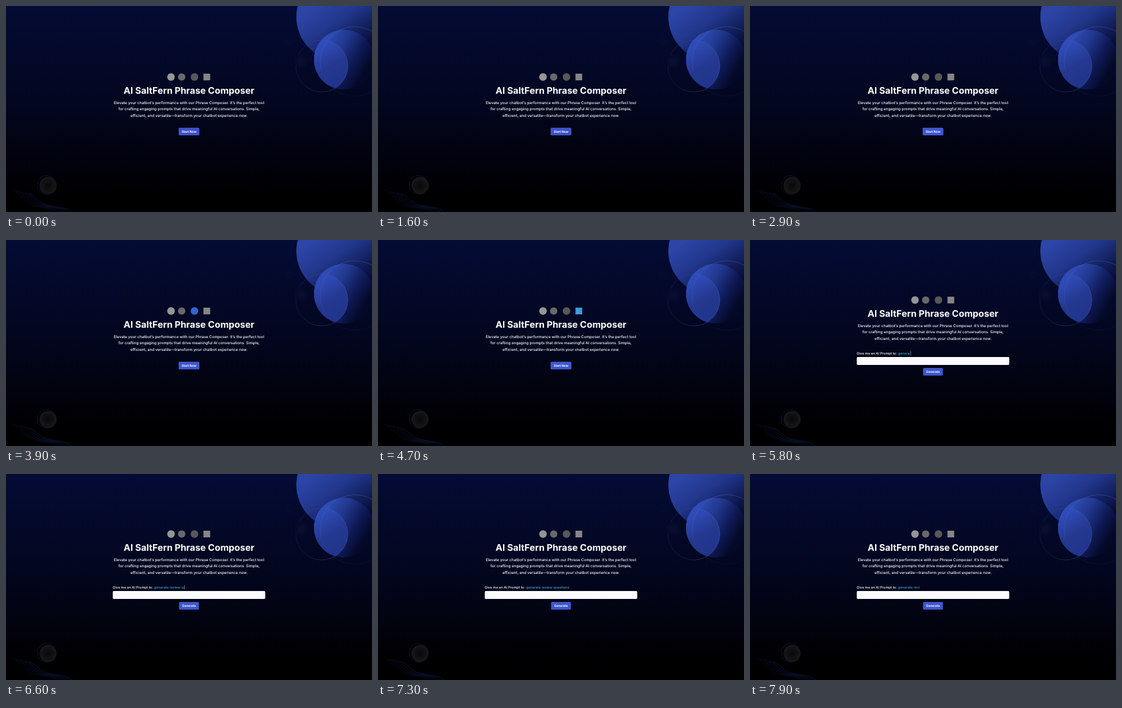
Animation of 600 by 338 pixels, one loop 8000 ms. Source, as an HTML page:

```html
<!DOCTYPE html>
<html lang="en">
<head>
<meta charset="utf-8">
<title>AI SaltFern Phrase Composer</title>
<style>
  html, body { margin: 0; width: 100%; height: 100%; overflow: hidden; background: #000; }
  svg { display: block; width: 100%; height: 100%; }
  text { font-family: Inter, "Open Sans", sans-serif; fill: #fff; text-rendering: geometricPrecision; white-space: pre; }
  .mid { text-anchor: middle; }
  .title { font-size: 15px; font-weight: 700; }
  .body { font-size: 6.25px; font-weight: 500; }
  .label { font-size: 5.625px; font-weight: 500; }
  .typed { fill: #3fa3d0; }
  .button { font-size: 5px; font-weight: 700; }
  .line { fill: none; stroke: #2a47b5; stroke-width: .5; }

  .head { animation: lift 8s step-end infinite; }
  .intro { animation: leave 8s step-end infinite; }
  .form { visibility: hidden; animation: enter 8s step-end infinite; }
  .start { fill: #3d52c9; animation: press 8s linear infinite; }
  .icon { fill: var(--gray); animation: tint 8s linear infinite; }

  @keyframes lift { 0% { transform: none; } 72.5%, 100% { transform: translateY(-18px); } }
  @keyframes leave { 0% { visibility: visible; } 72.5%, 100% { visibility: hidden; } }
  @keyframes enter { 0% { visibility: hidden; } 72.5%, 100% { visibility: visible; } }
  @keyframes press {
    0%, 20% { fill: #3d52c9; }
    23.75%, 66% { fill: #3f58d0; }
    68.5%, 100% { fill: #4a64f0; }
  }
  @keyframes tint {
    0% { fill: var(--gray); }
    2%, 5.5% { fill: var(--tint); }
    7.5%, 100% { fill: var(--gray); }
  }
</style>
</head>
<body>
<svg viewBox="0 0 600 338" preserveAspectRatio="none">
  <defs>
    <linearGradient id="sky" x2="0" y2="1">
      <stop offset="0" stop-color="#040b35"/>
      <stop offset=".5" stop-color="#02061d"/>
      <stop offset=".9" stop-color="#000002"/>
      <stop offset="1" stop-color="#000"/>
    </linearGradient>
    <linearGradient id="moon" gradientUnits="userSpaceOnUse" x1="505" y1="0" x2="565" y2="85">
      <stop offset="0" stop-color="#2c45a6"/>
      <stop offset=".4" stop-color="#22378c"/>
      <stop offset="1" stop-color="#060c36"/>
    </linearGradient>
    <linearGradient id="orb" gradientUnits="userSpaceOnUse" x1="518" y1="62" x2="590" y2="104">
      <stop offset="0" stop-color="#2f4dba"/>
      <stop offset=".35" stop-color="#22398f"/>
      <stop offset=".7" stop-color="#0f1a57"/>
      <stop offset="1" stop-color="#040927"/>
    </linearGradient>
    <linearGradient id="lens" gradientUnits="userSpaceOnUse" x1="512" y1="70" x2="550" y2="130">
      <stop offset="0" stop-color="#2f4bb8"/>
      <stop offset=".5" stop-color="#24388f"/>
      <stop offset="1" stop-color="#20348c"/>
    </linearGradient>
    <linearGradient id="arc" x1=".3" y1="0" x2=".6" y2="1">
      <stop offset="0" stop-color="#5a70c4" stop-opacity=".8"/>
      <stop offset="1" stop-color="#2a3a80" stop-opacity=".25"/>
    </linearGradient>
    <linearGradient id="ring">
      <stop offset="0" stop-color="#2a3a80" stop-opacity=".6"/>
      <stop offset="1" stop-color="#5a70c4" stop-opacity=".8"/>
    </linearGradient>
    <radialGradient id="dust">
      <stop offset="0" stop-color="#08080a"/>
      <stop offset=".6" stop-color="#111113"/>
      <stop offset="1" stop-color="#18181b"/>
    </radialGradient>
    <clipPath id="overlap"><circle cx="517.7" cy="98.5" r="42.5"/></clipPath>
  </defs>

  <rect width="600" height="338" fill="url(#sky)"/>

  <circle cx="549" cy="18" r="73" fill="url(#moon)"/>
  <circle cx="554" cy="88" r="49" fill="url(#orb)"/>
  <circle cx="554" cy="88" r="49" fill="url(#lens)" clip-path="url(#overlap)"/>
  <circle cx="572" cy="91" r="57" fill="none" stroke="url(#arc)" stroke-width=".5"/>
  <circle cx="517.7" cy="98.5" r="42.5" fill="none" stroke="url(#ring)" stroke-width=".5"/>
  <circle cx="465" cy="57" r="5.5" fill="#040a2c" stroke="#0a133f" stroke-width=".5"/>
  <circle cx="484" cy="90" r="11" fill="#060b2b"/>
  <circle cx="484" cy="90" r="6" fill="#080e2f"/>

  <circle class="line" cx="66.5" cy="293.5" r="15.3" opacity=".5"/>
  <circle cx="69" cy="294.5" r="14" fill="url(#dust)"/>
  <g id="waves" class="line" opacity=".6"></g>

  <g class="head">
    <circle class="icon" cx="270.5" cy="116.5" r="6.2" style="--gray:#959595;--tint:#74aa9c;animation-delay:2.95s"/>
    <circle class="icon" cx="288" cy="116.5" r="6" style="--gray:#696969;--tint:#4a7fd6;animation-delay:3.15s"/>
    <circle class="icon" cx="309" cy="116.5" r="6.2" style="--gray:#585858;--tint:#2f66d0;animation-delay:3.7s"/>
    <rect class="icon" x="323.7" y="111" width="11" height="11" style="--gray:#858585;--tint:#3f9bd6;animation-delay:4.45s"/>
    <text class="title mid" x="300" y="143.6">AI SaltFern Phrase Composer</text>
    <text class="body mid" x="300" y="161.2">Elevate your chatbot’s performance with our Phrase Composer. It’s the perfect tool</text>
    <text class="body mid" x="300" y="171.4">for crafting engaging prompts that drive meaningful AI conversations. Simple,</text>
    <text class="body mid" x="300" y="181.6">efficient, and versatile—transform your chatbot experience now.</text>
  </g>

  <g class="intro">
    <rect class="start" x="283" y="199.7" width="34" height="12.6" rx="1.6"/>
    <text class="button mid" x="300" y="207.9">Start Now</text>
  </g>

  <g class="form">
    <text class="label" x="175" y="188">Give me an AI Prompt to:</text>
    <text class="label typed" x="242.8" y="188"><tspan id="words"></tspan><tspan id="caret" dx=".6" fill="#dfe6f5">|</tspan></text>
    <rect x="175" y="192" width="250" height="13" rx="1.8" fill="#fafaff"/>
    <rect x="283.8" y="210" width="32.4" height="12.6" rx="1.6" fill="#3f57d0"/>
    <text class="button mid" x="300" y="218.2">Generate</text>
  </g>
</svg>
<script>
  const LOOP = 8000;
  const PHRASE = "generate review questions";
  const words = document.getElementById("words");
  const caret = document.getElementById("caret");
  const waves = document.getElementById("waves");

  for (let i = 0; i < 5; i++) {
    const path = document.createElementNS("http://www.w3.org/2000/svg", "path");
    const x = 10 + i * 7, y = 302 + i * 1.5;
    const midX = 48 + i * 5, midY = 329 - i * .6;
    path.setAttribute("d", `M${x} ${y}C${x + 14} ${y + 5} ${midX - 16} ${midY - 4} ${midX} ${midY}S${78 + i * 6} ${331 - i * .3} ${85 + i * 6} 339`);
    path.setAttribute("opacity", .6 + i * .1);
    waves.append(path);
  }

  // Types at 70 ms per letter, then erases at 50 ms per letter.
  function letters(t) {
    const count = t < 7300
      ? 17 + Math.floor((t - 6560) / 70)
      : PHRASE.length - Math.floor((t - 7300) / 50);
    return Math.max(0, Math.min(PHRASE.length, count));
  }

  let start;
  function draw(now) {
    start ??= now;
    const t = (now - start) % LOOP;
    const text = PHRASE.slice(0, letters(t));
    if (words.textContent !== text) words.textContent = text;
    const beat = t % 1000;
    caret.setAttribute("opacity", beat >= 350 && beat < 850 ? 1 : 0);
    requestAnimationFrame(draw);
  }
  requestAnimationFrame(draw);
</script>
</body>
</html>
```
